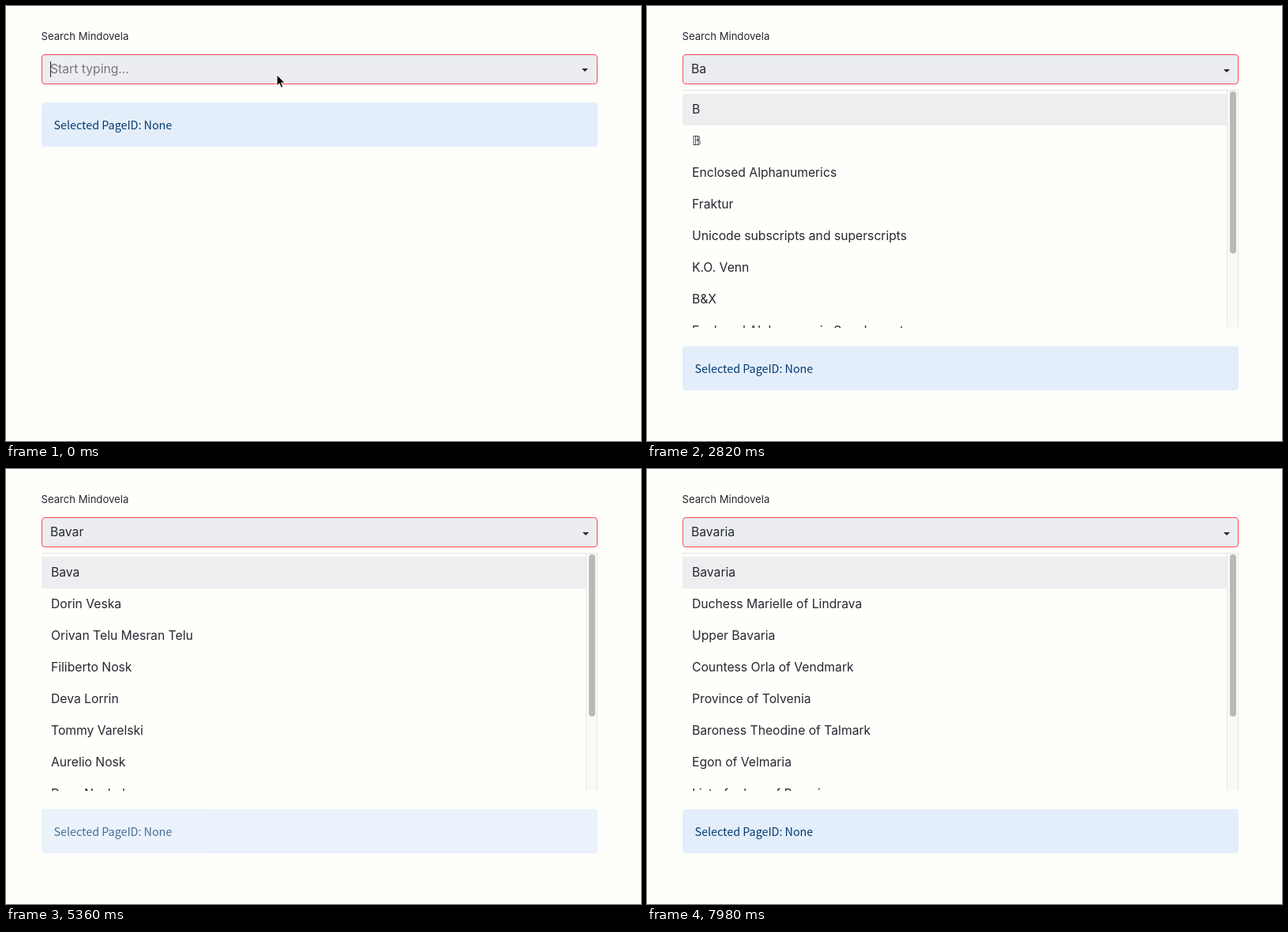
Animation, 804 px wide and 550 px high, one loop 8000 ms. Source, as an HTML page:

```html
<!DOCTYPE html>
<html lang="en">
<head>
<meta charset="utf-8">
<title>Search box</title>
<style>
  html, body { margin: 0; width: 100%; height: 100%; overflow: hidden; background: #fefefb; }
  body { position: relative; font: 15.7px Inter, sans-serif; color: #262730; }
  body > *, #list > *, #field svg { position: absolute; box-sizing: border-box; }
  #label { left: 44.5px; top: 28px; font-size: 13.1px; line-height: 20px; white-space: nowrap; }
  #field { left: 45px; top: 61px; width: 704px; height: 38px; padding-left: 10px;
    border: 1px solid #ff4b4b; border-radius: 4px; background: #ebedf1; line-height: 36px; white-space: nowrap; }
  #placeholder { color: #75767c; }
  #caret { display: inline-block; width: 1px; height: 20px; margin-right: -1px; vertical-align: -5px; background: #222; }
  #field svg { left: 0; top: 0; }
  #list { left: 45px; top: 106px; width: 704px; height: 301px; overflow: hidden; border-top: 1px solid #e2e2e2; }
  #rows { left: 0; top: 4px; width: 689px; line-height: 40px; white-space: nowrap; }
  #rows div { height: 40px; padding-left: 12px; }
  #rows div:first-child { background: #edeef0; }
  #rows .symbol { font: 16px/40px "DejaVu Sans", sans-serif; }
  #track { left: 689px; top: 0; width: 15px; height: 300px; background: #f9f9f8;
    border: solid #e6e6e6; border-width: 0 1px; }
  #thumb { left: 693px; top: 1px; width: 8px; height: 205px; border-radius: 4px; background: #b9b9b9; }
  #empty { left: 45px; top: 106px; width: 704px; height: 50px; border-top: 1px solid #e2e2e2;
    line-height: 49px; text-align: center; color: #92939a; padding-right: 1px; }
  #alert { left: 45px; width: 704px; height: 56px; padding-left: 15.5px; border-radius: 4px;
    background: #e4eefb; color: #003a70;
    font: 14.3px/56px "Noto Sans CJK JP", "Noto Sans CJK", "Noto Sans CJK SC", "Open Sans", sans-serif; }
  #pointer { left: 341px; top: 86px; }
</style>
</head>
<body>
<div id="label">Search Mindovela</div>
<div id="field"><span id="typed"></span><span id="caret"></span><span id="placeholder">Start typing...</span>
  <svg width="702" height="36"><path id="arrow" d="M683 17h8l-4 4z" fill="#262730"/></svg>
</div>
<div id="empty">No options</div>
<div id="list"><div id="rows"></div><div id="track"></div><div id="thumb"></div></div>
<div id="alert">Selected PageID: None</div>
<svg id="pointer" width="16" height="20"><path d="M2 1v14l3.2-3 2.2 5.2 2.4-1-2.2-5H12z" fill="#000" stroke="#fff"/></svg>
<script>
const LOOP = 8000;
const WORD = "Bavaria";
const keyTimes = [1080, 2000, 2950, 3950, 4700, 5450, 6180];

const results = [
  [2300, ["B", "𝔹", "Enclosed Alphanumerics", "Fraktur", "Unicode subscripts and superscripts",
    "K.O. Venn", "B&X", "Enclosed Alphanumeric Supplement"]],
  [3700, ["BAV", "Bavly", "KLT 920", "Bicuspid aortic valve", "The Glasswinter (2022 film)",
    "QTRN&K", "Edvin Solmar", "Sarah Bentel"]],
  [4420, ["Bava", "Dorin Veska", "Orivan Telu Mesran Telu", "Filiberto Nosk", "Deva Lorrin",
    "Tommy Varelski", "Aurelio Nosk", "Deva Noshel"]],
  [5700, ["Bavari", "Baiuvarii", "Morbillivirus", "Human metapneumovirus", "Mononegavirales",
    "Lyssavirus", "Henipavirus", "Strain (biology)"]],
  [7250, ["Bavaria", "Duchess Marielle of Lindrava", "Upper Bavaria", "Countess Orla of Vendmark",
    "Province of Tolvenia", "Baroness Theodine of Talmark", "Egon of Velmaria", "List of rulers of Bavaria"]]
];

// The message dims while a search is pending; the next result restores it.
const dimTimes = [1650, 3150, 4750, 6180];

const $ = id => document.getElementById(id);
const show = (id, visible) => { $(id).style.display = visible ? "" : "none"; };
const clamp = x => Math.min(1, Math.max(0, x));
let shownRows;

function alertOpacity(t, refreshed) {
  const start = dimTimes.findLast(time => t >= time);
  if (start === undefined || refreshed > start) return 1;
  return 1 - 0.67 * clamp((t - start) / 1000) ** 1.8;
}

function fillRows(rows) {
  if (rows === shownRows) return;
  shownRows = rows;
  $("rows").replaceChildren(...rows.map(text => {
    const row = document.createElement("div");
    row.textContent = text;
    if (text === "𝔹") row.className = "symbol";
    return row;
  }));
}

function draw(t) {
  const typedCount = keyTimes.filter(time => t >= time).length;
  const typing = typedCount > 0;
  const result = results.findLast(([time]) => t >= time);
  const caretOff = typing ? keyTimes[typedCount - 1] + 520 : 720;

  $("typed").textContent = WORD.slice(0, typedCount);
  $("caret").style.opacity = 1 - clamp((t - caretOff) / 60);
  $("arrow").setAttribute("transform", typing ? "translate(1 1)" : "");
  show("placeholder", !typing);
  show("pointer", !typing);
  show("empty", typing && !result);
  show("list", !!result);
  if (result) fillRows(result[1]);

  $("alert").style.top = (result ? 430 : typing ? 178 : 122) + "px";
  $("alert").style.opacity = alertOpacity(t, result ? result[0] : 0);
}

function tick(now) {
  draw(now % LOOP);
  requestAnimationFrame(tick);
}
draw(0);
requestAnimationFrame(tick);
</script>
</body>
</html>
```
